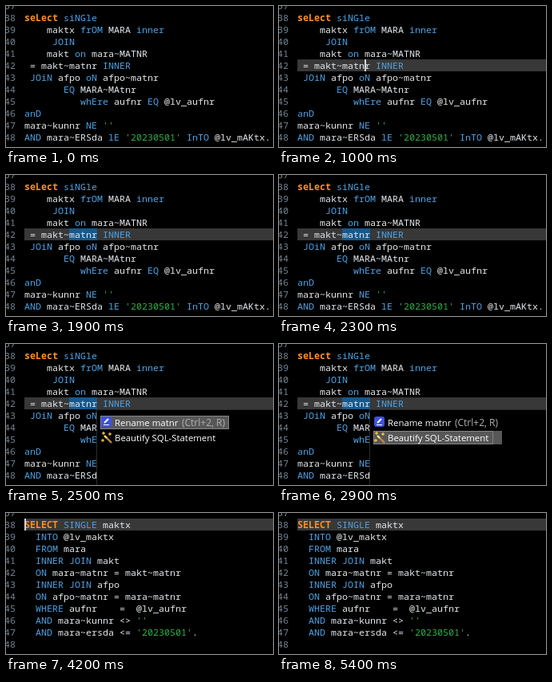
Recreate the animation shown at these times as an HTML page with a canvas. Size 334 by 177 pixels, loop 5500 ms.

```html
<!DOCTYPE html>
<html lang="en">
<head>
<meta charset="utf-8">
<title>Beautify SQL statement</title>
<style>
  html, body { margin: 0; width: 100%; height: 100%; overflow: hidden; background: #000; }
  canvas { display: block; }
</style>
</head>
<body>
<canvas id="stage" width="334" height="177"></canvas>
<script>
const ctx = document.getElementById('stage').getContext('2d');
const WIDTH = 334, HEIGHT = 177, LOOP = 5500;
const LEFT = 23, CHAR = 7, LINE = 15, FIRST = 38;
const MONO = '11.667px "Noto Sans Mono", monospace';
const UI = '11.4px "Open Sans", sans-serif';
const COLOR = {
  keyword: '#4fa3e6', name: '#e4e8ec', string: '#2fb04a',
  select: '#ff8f1f', number: '#748390', band: '#383838',
  mark: '#dd8a5c', selection: '#17598c', caret: '#d4d4d4'
};

const messy = [
  'seLect siNGle',
  '    maktx frOM MARA inner',
  '     JOIN',
  '    makt on mara~MATNR',
  ' = makt~matnr INNER',
  ' JOiN afpo oN afpo~matnr',
  '       EQ MARA~MAtnr',
  '          whEre aufnr EQ @lv_aufnr',
  'anD',
  "mara~kunnr NE ''",
  "AND mara~ERSda lE '20230501' InTO @lv_mAKtx."
];
const tidy = [
  'SELECT SINGLE maktx',
  '  INTO @lv_maktx',
  '  FROM mara',
  '  INNER JOIN makt',
  '  ON mara~matnr = makt~matnr',
  '  INNER JOIN afpo',
  '  ON afpo~matnr = mara~matnr',
  '  WHERE aufnr    =  @lv_aufnr',
  "  AND mara~kunnr <> ''",
  "  AND mara~ersda <= '20230501'."
];
const keyword = /^(single|from|inner|join|on|eq|where|and|ne|le|into)$/i;

const rowTop = line => 7 + (line - FIRST) * LINE;
const columnX = column => LEFT + column * CHAR;

function box(x, y, w, h, color) {
  ctx.fillStyle = color;
  ctx.fillRect(x, y, w, h);
}

function write(text, x, y, color, font) {
  ctx.font = font;
  ctx.fillStyle = color;
  ctx.fillText(text, x, y);
}

function tokenColor(token) {
  if (/^select$/i.test(token)) return COLOR.select;
  if (token[0] === "'") return COLOR.string;
  return keyword.test(token) ? COLOR.keyword : COLOR.name;
}

function drawCode(lines) {
  lines.forEach((text, row) => {
    for (const match of text.matchAll(/'\d*'|@?\w+|[=<>]+|[~.]/g)) {
      const color = tokenColor(match[0]);
      const font = color === COLOR.select ? 'bold ' + MONO : MONO;
      write(match[0], columnX(match.index), rowTop(FIRST + row) + 12, color, font);
    }
  });
}

function drawNumbers() {
  for (let line = FIRST - 1; line <= 48; line++) {
    write(line, -2, rowTop(line) + 12, COLOR.number, MONO);
  }
}

const band = line => box(LEFT, rowTop(line), WIDTH - LEFT, LINE, COLOR.band);
const caret = (line, column) => box(columnX(column), rowTop(line), 2, LINE, COLOR.caret);
const markWord = (line, column, color) =>
  box(columnX(column), rowTop(line), 5 * CHAR, LINE, color);

function stroke(color, width, ...points) {
  ctx.strokeStyle = color;
  ctx.lineWidth = width;
  ctx.beginPath();
  points.forEach(([x, y]) => ctx.lineTo(x, y));
  ctx.stroke();
}

function penIcon() {
  ctx.fillStyle = '#3f50e0';
  ctx.beginPath();
  ctx.roundRect(119, 91, 13, 13, 3);
  ctx.fill();
  stroke('#fff', 2.2, [123, 99], [128, 94]);
  stroke('#fff', 1, [122, 101.5], [129, 101.5]);
}

function wandIcon() {
  stroke('#c08a45', 2.4, [124, 116], [132, 124]);
  stroke('#ffe27a', 2.4, [123, 115], [126, 118]);
  for (const [x, y] of [[122, 112], [130, 113], [121, 121]]) {
    stroke('#ffd23f', 1.2, [x - 2, y], [x + 2, y]);
    stroke('#ffd23f', 1.2, [x, y - 2], [x, y + 2]);
  }
}

function drawMenu(time) {
  box(113, 82, WIDTH - 113, HEIGHT - 82, '#2c2c2c');
  box(114, 83, WIDTH - 114, HEIGHT - 83, '#000');
  if (time < 2500) return;
  const beautify = time >= 2900;
  const top = beautify ? 109 : 90, focusWidth = beautify ? 150 : 161;
  box(118, top, 161, 17, '#575757');
  ctx.setLineDash([1, 1]);
  ctx.strokeStyle = '#b0b0b0';
  ctx.lineWidth = 1;
  ctx.strokeRect(118.5, top + 0.5, focusWidth - 1, 16);
  ctx.setLineDash([]);
  penIcon();
  wandIcon();
  write('Rename matnr', 136, 103, '#fff', UI);
  write('(Ctrl+2, R)', 220, 103, '#b0b0b0', '12px "Open Sans", sans-serif');
  write('Beautify SQL-Statement', 136, 122, '#fff', UI);
}

function draw(time) {
  box(0, 0, WIDTH, HEIGHT, '#000');
  drawNumbers();

  if (time >= 3200) {
    band(38);
    drawCode(tidy);
    if (time < 4600 || (time >= 5100 && time < 5400)) caret(38, 0);
    return;
  }

  if (time >= 1000) band(42);
  if (time >= 1800 && time < 1900) {
    [[41, 17], [42, 8], [43, 19], [44, 15]].forEach(([line, column]) =>
      markWord(line, column, COLOR.mark));
  }
  if (time >= 1900) markWord(42, 8, COLOR.selection);
  drawCode(messy);
  if (time >= 1000 && time < 1500) caret(42, 12);
  if (time >= 2400) drawMenu(time);
}

const start = performance.now();
function tick() {
  draw((performance.now() - start) % LOOP);
  requestAnimationFrame(tick);
}
tick();
</script>
</body>
</html>
```
